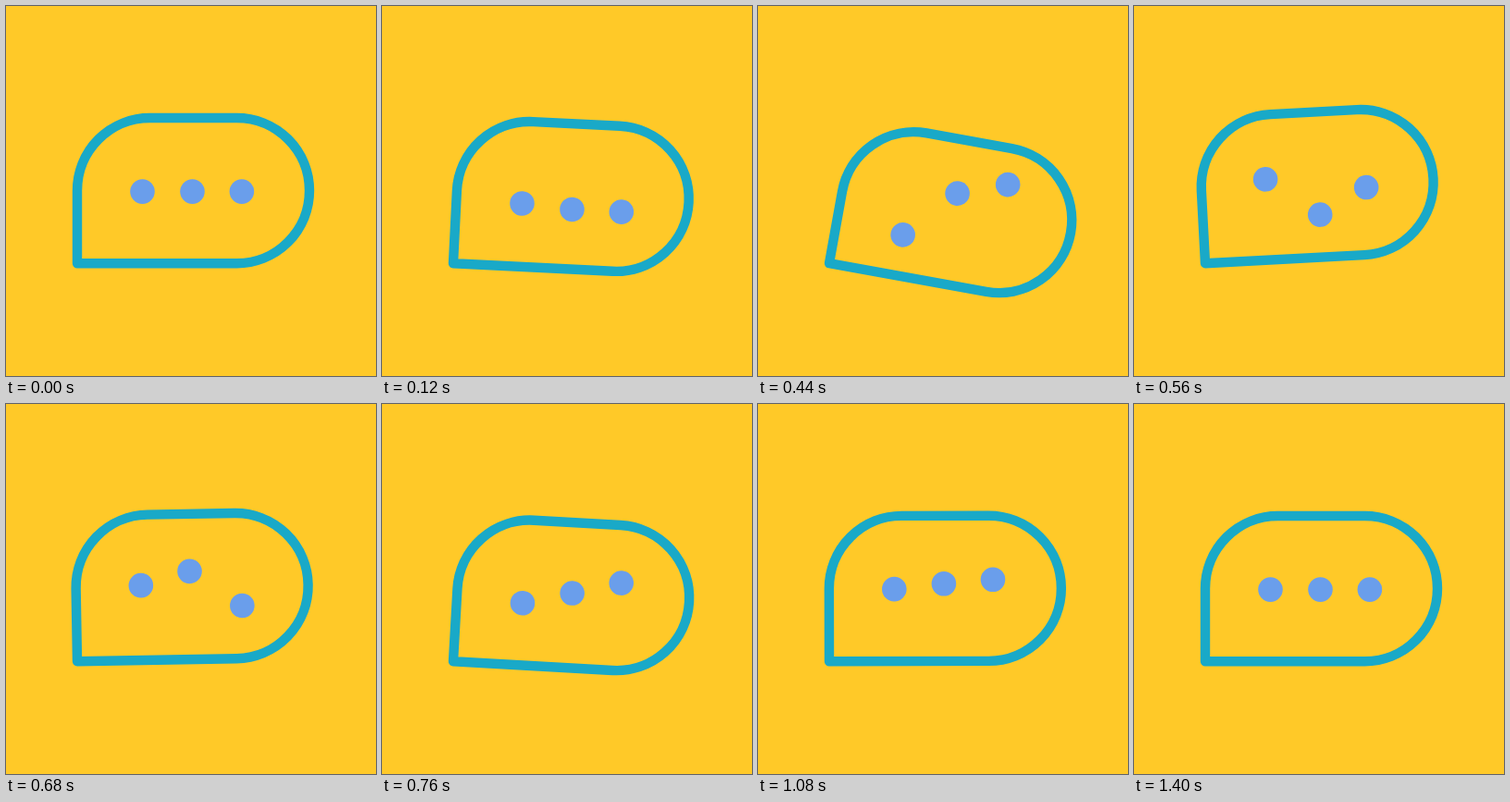
An HTML page that plays this animation: 400 px wide and 400 px high, repeating every 1480 ms.

```html
<!DOCTYPE html>
<html lang="en">
<head>
<meta charset="utf-8">
<title>Chat bubble</title>
<style>
  html, body { margin: 0; height: 100%; overflow: hidden; background: #ffc928; }
  svg { display: block; width: 100%; height: 100%; }
</style>
</head>
<body>
<svg viewBox="0 0 400 400">
  <g id="bubble">
    <path d="M77 278.2V199.6A78.6 78.6 0 0 1 155.6 121H249.4A78.6 78.6 0 0 1 249.4 278.2Z"
          fill="none" stroke="#19a9c8" stroke-width="10.4" stroke-linejoin="round"/>
    <g fill="#6a9eeb">
      <circle class="dot" cx="147.5" cy="200.6" r="13.3"/>
      <circle class="dot" cx="201.5" cy="200.6" r="13.3"/>
      <circle class="dot" cx="254.9" cy="200.6" r="13.3"/>
    </g>
  </g>
</svg>
<script>
const LOOP = 1480, STEP = 40, LAST = 1400;
const WIND_UP = 70, LAUNCH = 234, HALF_SWING = 150, SETTLE = 210;
const TILT = 13, HOP = 42, LEAN = 0.073;
const peaks = [-1, 0.8, -0.42, 0.25, -0.25];

const bubble = document.getElementById('bubble');
const dots = document.querySelectorAll('.dot');

const clamp = x => Math.min(1, Math.max(0, x));
const ease = x => x ** 3 * (10 - 15 * x + 6 * x * x);
const mix = (a, b, x) => a + (b - a) * ease(clamp(x));

// Wind up, wait for the delay, launch, then swing with falling peaks
function wobble(t, delay = 0) {
  let value = mix(0, 0.31, t / WIND_UP);
  t -= WIND_UP + delay;
  value = mix(value, peaks[0], t / LAUNCH);
  t -= LAUNCH;
  for (const peak of peaks.slice(1)) {
    value = mix(value, peak, t / HALF_SWING);
    t -= HALF_SWING;
  }
  return mix(value, 0, t / SETTLE);
}

function draw(now) {
  const t = Math.min(LAST, Math.floor(now % LOOP / STEP) * STEP);
  bubble.setAttribute('transform', `rotate(${TILT * wobble(t)} 77 278.2)`);
  dots.forEach((dot, i) => {
    const y = HOP * wobble(t, 80 * i ** 1.1);
    dot.setAttribute('transform', `translate(${y * LEAN} ${y})`);
  });
}

const start = performance.now();
function frame() {
  draw(performance.now() - start);
  requestAnimationFrame(frame);
}
frame();
</script>
</body>
</html>
```
